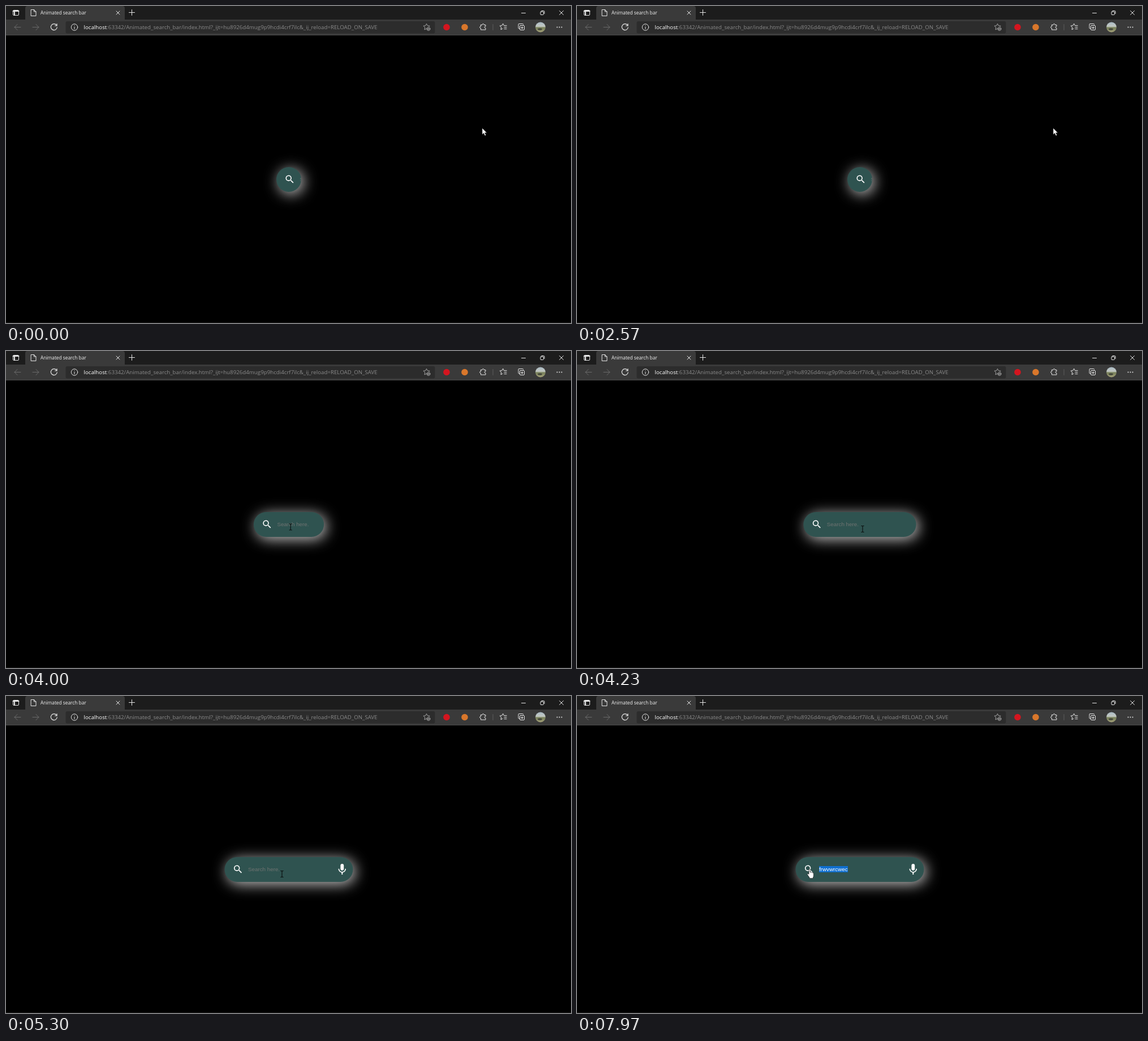
Animation of 999x561 px, one loop 8000 ms. Source, as an HTML page:

```html
<!DOCTYPE html>
<html lang="en">
<head>
<meta charset="utf-8">
<title>Animated search bar</title>
<style>
  html, body { margin: 0; width: 100%; height: 100%; overflow: hidden; background: #000; }
  svg { display: block; width: 100%; height: 100%; }
  .ui { font-family: "Open Sans", "Noto Sans", sans-serif; }
  .field { font: 9.8px "Liberation Sans", Arial, sans-serif; }
  .line { fill: none; stroke: #e6e6e6; stroke-width: 1; stroke-linecap: round; stroke-linejoin: round; }
  .dim { stroke: #6a6a6a; }
  .mid { stroke: #a2a2a2; }
</style>
</head>
<body>
<svg viewBox="0 0 999 561" xmlns="http://www.w3.org/2000/svg">
  <defs>
    <filter id="blur" filterUnits="userSpaceOnUse" x="300" y="220" width="400" height="180">
      <feGaussianBlur stdDeviation="13"/>
    </filter>
    <clipPath id="barClip"><rect class="bar" y="285" height="44" rx="22"/></clipPath>
    <clipPath id="selClip"><rect class="sel" y="301" height="11"/></clipPath>
    <linearGradient id="photo" x2="0" y2="1">
      <stop offset="0" stop-color="#a9b9c4"/>
      <stop offset=".42" stop-color="#c3c8c2"/>
      <stop offset=".55" stop-color="#77805a"/>
      <stop offset="1" stop-color="#a3a078"/>
    </linearGradient>
  </defs>

  <rect width="999" height="561"/>
  <rect y="560" width="999" height="1" fill="#1a1a1a"/>

  <!-- tab strip and toolbar -->
  <rect width="999" height="24" fill="#1c1c1c"/>
  <rect y="24" width="999" height="28" fill="#3a3a3a"/>
  <rect y="51" width="999" height="1" fill="#4a4a4a"/>
  <path d="M34 24V4q0-4 4-4h168q4 0 4 4v20z" fill="#3a3a3a"/>
  <rect x="105.500" y="27" width="653" height="21.500" rx="3" fill="#2c2c2c"/>

  <g class="line">
    <rect x="12.500" y="7.500" width="10" height="9" rx="1.500"/>
    <path d="M12.500 9h10M15 9v7" stroke-width="2"/>
    <path d="M44.500 6.500h5l3.500 3.500v7.500h-8.500zM49.500 6.500v3.500h3.500"/>
    <path d="M195 9l6 6M201 9l-6 6M217.500 11.500h10M222.500 6.500v10"/>
    <path d="M911.500 12.500h7M978.500 8.500l7 7M985.500 8.500l-7 7"/>
    <rect x="945" y="10" width="5.500" height="5.500" rx="1"/>
    <path d="M947 8.500h3.500q1.500 0 1.500 1.500v3.500"/>
    <path class="dim" d="M26 37.500H15M20 32.500l-5 5 5 5M47 37.500h11M53 32.500l5 5-5 5"/>
    <path d="M89.500 34.200a5.500 5.500 0 1 0 .8 3.600M90 31.500v3.500h-3.500" stroke-width="1.200"/>
    <circle cx="121" cy="37.500" r="5.700"/>
    <path d="M121 37v3.500M121 34.500v.1"/>
    <path class="mid" d="M746 41l-2.500-1-3.500 2 .8-4-2.800-2.800 3.900-.5 1.600-3.400 1.700 3.400 3.900.5-1 1.300"/>
    <circle class="mid" cx="747" cy="40.500" r="3"/>
    <path class="mid" d="M745.500 40.500h3M747 39v3"/>
    <path d="M839.500 33.500h2.500q0-2 1.600-2t1.600 2h2.800v2.600q-2 0-2 1.500t2 1.500v3h-8.500v-3q-2 0-2-1.500t2-1.500z"/>
    <path d="M861 32.500v10" stroke="#5c5c5c"/>
    <path d="M878 40l-3 1.800.7-4-2.700-2.700 3.900-.5 1.800-3.500 1.700 3.500h4.800M881 37.500h4M881 40.500h4"/>
    <path d="M908 40h-1q-1 0-1-1v-6.500q0-1 1-1h6.500q1 0 1 1v.5"/>
    <rect x="908.500" y="34.500" width="8" height="8" rx="1.500"/>
    <path d="M910.500 38.500h4M912.500 36.500v4"/>
  </g>
  <circle cx="779" cy="37.500" r="5.800" fill="#d4151f"/>
  <circle cx="811" cy="37.500" r="5.800" fill="#d9772b"/>
  <circle cx="945" cy="37.500" r="9" fill="url(#photo)"/>
  <ellipse cx="944" cy="41" rx="4" ry="1.800" fill="#44483a"/>
  <g fill="#e6e6e6">
    <circle cx="974.500" cy="37.500" r="1"/><circle cx="978.500" cy="37.500" r="1"/><circle cx="982.500" cy="37.500" r="1"/>
  </g>
  <text class="ui" x="61" y="15" font-size="8.350" fill="#f2f2f2">Animated search bar</text>
  <text class="ui" x="137.500" y="41" font-size="9.730" fill="#8a8a8a"><tspan fill="#fff">localhost</tspan>:63342/Animated_search_bar/index.html?_ijt=hu8926d4mug9p9hcdi4crf7ilc&amp;_ij_reload=RELOAD_ON_SAVE</text>

  <!-- search bar -->
  <rect class="bar" y="285" height="44" rx="22" fill="#c8c8c8" filter="url(#blur)" transform="translate(4 4)"/>
  <rect class="bar" y="285" height="44" rx="22" fill="#2f5350"/>
  <g clip-path="url(#barClip)">
    <g id="content">
      <path transform="translate(14.100 297.100) scale(.8)" fill="#fff" d="M15.500 14h-.8l-.3-.3a6.500 6.500 0 1 0-.7.700l.3.300v.800l5 5 1.500-1.500zM9.500 14a4.500 4.500 0 1 1 0-9 4.500 4.500 0 0 1 0 9z"/>
      <path transform="translate(196.200 295.100) scale(.97)" fill="#fff" d="M12 14a3 3 0 0 0 3-3V5a3 3 0 0 0-6 0v6a3 3 0 0 0 3 3zM17.300 11a5.300 5.300 0 0 1-10.600 0H5a7 7 0 0 0 6 6.900V21.500h2V17.900a7 7 0 0 0 6-6.900z"/>
      <text id="hint" class="field" x="41.500" y="310" fill="#6f7371">Search here.</text>
      <text class="field typed" x="41.500" y="310" fill="#4a4743"></text>
      <rect id="caret" x="41.500" y="302" width="1" height="10" fill="#111"/>
    </g>
    <rect class="sel" y="301" height="11" fill="#0f6fd0"/>
    <text class="field typed" x="428" y="310" fill="#fff" clip-path="url(#selClip)"></text>
  </g>

  <!-- pointers, each with its hot spot at 0,0 -->
  <g id="arrow"><path d="M0 0v11.600l2.700-2.500 2 4.500 2-.9-2-4.300h3.500z" fill="#fff" stroke="#000" stroke-width=".5"/></g>
  <g id="hand"><path d="M-1 .800Q0-.600 1.100.800V6l1-.5q1 0 1.300.8 1.500-.6 2 .6 1.700-.3 2 1.200v3.900q0 1.800-1 3v1.700H0V15.200L-3.300 10.600q-1-1.600.2-2.200 1-.3 2.100 1.200z" fill="#fff" stroke="#000" stroke-width=".6"/></g>
  <g id="beam"><path d="M-2.500-5.500h1.700q.8 0 .8.800v9.400q0 .8-.8.800h-1.700M2.500-5.500H.8Q0-5.500 0-4.700M2.500 5.500H.8Q0 5.500 0 4.700" fill="none" stroke="#050505"/></g>
</svg>
<script>
const LOOP = 8000;
const CENTER = 500, CLOSED = 44, OPEN = 227;
const OPEN_AT = 3790, OPEN_MS = 800;
const TEXT_LEFT = 428, TEXT_RIGHT = 479;
const WORD = "frwvwrcwec";
const KEY_TIMES = [6330, 6370, 6400, 6570, 6640, 6700, 6770, 6830, 6900, 7200];
const DRAG_AT = 7370;

// time, x, y
const PATH = [
  [0, 842, 216], [2570, 842, 216], [3300, 508, 312], [3400, 508, 312],
  [3650, 502, 308], [3850, 502, 309], [4200, 505, 315], [4300, 505, 315],
  [4830, 488, 315], [5300, 488, 315], [5430, 486, 315], [7200, 486, 315],
  [DRAG_AT, 492, 313], [7900, 412, 308], [7970, 411, 306], [LOOP, 411, 306]
];

const byId = id => document.getElementById(id);
const all = selector => document.querySelectorAll(selector);
const clamp = (v, lo, hi) => Math.min(hi, Math.max(lo, v));
const show = (el, on) => el.setAttribute("display", on ? "inline" : "none");
const pointers = ["arrow", "hand", "beam"].map(byId);

function setSpan(selector, x, width) {
  all(selector).forEach(el => {
    el.setAttribute("x", x);
    el.setAttribute("width", width);
  });
}

// CSS "ease": cubic-bezier(.25, .1, .25, 1)
function ease(x) {
  const bezier = (u, a, b) => 3 * a * u * (1 - u) ** 2 + 3 * b * u * u * (1 - u) + u ** 3;
  let lo = 0, hi = 1;
  for (let i = 0; i < 20; i++) {
    const mid = (lo + hi) / 2;
    if (bezier(mid, .25, .25) < x) lo = mid; else hi = mid;
  }
  return bezier(lo, .1, 1);
}

function pointerAt(t) {
  const next = Math.max(1, PATH.findIndex(p => p[0] > t));
  const [t0, x0, y0] = PATH[next - 1], [t1, x1, y1] = PATH[next];
  const u = (t - t0) / (t1 - t0), s = u * u * (3 - 2 * u);
  return [x0 + (x1 - x0) * s, y0 + (y1 - y0) * s];
}

function drawPointer(x, y, left, width) {
  const inBar = y > 285 && y < 329 && x > left && x < left + width;
  const kind = !inBar ? "arrow" : x < left + 38 ? "hand" : "beam";
  pointers.forEach(el => show(el, el.id === kind));
  byId(kind).setAttribute("transform", `translate(${x} ${y})`);
}

function render(t) {
  const grow = ease(clamp((t - OPEN_AT) / OPEN_MS, 0, 1));
  const width = CLOSED + (OPEN - CLOSED) * grow;
  const left = CENTER - width / 2;
  setSpan(".bar", left, width);
  byId("content").setAttribute("transform", `translate(${left} 0)`);

  const typed = KEY_TIMES.filter(k => k <= t).length;
  all(".typed").forEach(el => { el.textContent = WORD.slice(0, typed); });
  show(byId("hint"), typed === 0);
  show(byId("caret"), (t >= 5430 && t < 5830) || (t >= 6100 && t < 6330));

  const [x, y] = pointerAt(t);
  const selLeft = t < DRAG_AT ? TEXT_RIGHT : clamp(x, TEXT_LEFT, TEXT_RIGHT);
  setSpan(".sel", selLeft, TEXT_RIGHT - selLeft);
  drawPointer(x, y, left, width);
}

const start = performance.now();
function tick() {
  render((performance.now() - start) % LOOP);
  requestAnimationFrame(tick);
}
tick();
</script>
</body>
</html>
```
